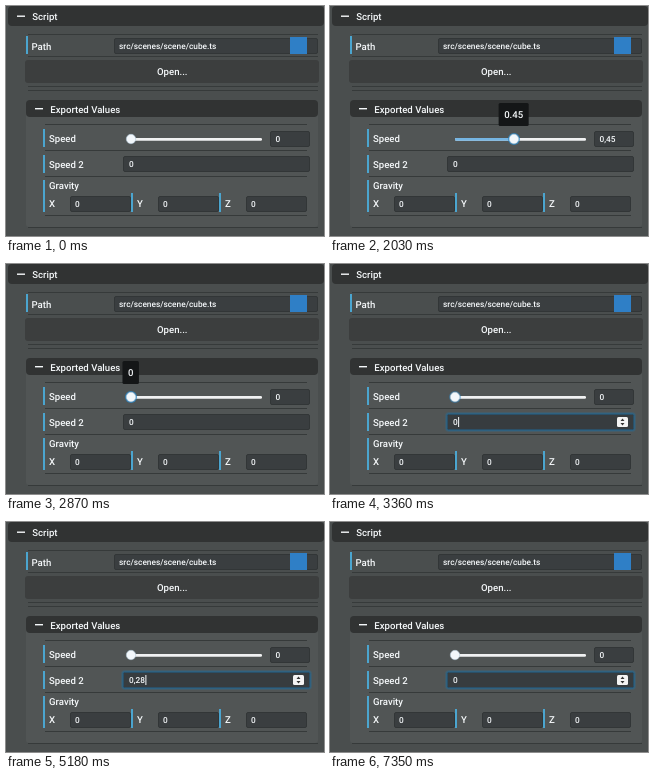
Animation, 318 px wide and 230 px high, one loop 7420 ms. Source, as an HTML page:

```html
<!DOCTYPE html>
<html lang="en">
<head>
<meta charset="utf-8">
<title>Inspector</title>
<style>
html, body { margin: 0; width: 100%; height: 100%; overflow: hidden; background: #4a4e4e; }
svg {
  display: block; width: 318px; height: 230px; fill: #f5f8fa;
  font: 500 9.6px Roboto, Arial, sans-serif; text-rendering: geometricPrecision;
}
.bar { fill: #313333; }
.button { fill: #3c3e3e; }
.mark { fill: #4ba5cf; }
.rule { stroke: #363a3a; stroke-width: 1; }
.field { fill: #3a3e40; stroke: #323637; stroke-width: 1; }
.value { font-size: 8.3px; }
</style>
</head>
<body>
<svg viewBox="0 0 318 230">
  <rect width="318" height="230" fill="#4a4e4e"/>
  <rect x="20" y="97" width="292" height="124" rx="3" fill="#515555"/>
  <g id="panel"></g>

  <rect x="284" y="31" width="17" height="17" fill="#2f7fc6"/>

  <g id="focus" fill="none">
    <rect x="116.5" y="149.5" width="188" height="17" rx="2" stroke="#137cbd" stroke-opacity=".25" stroke-width="2.5"/>
    <rect x="117" y="150" width="187" height="16" rx="1.5" fill="#373c3f" stroke="#1f6491"/>
  </g>
  <text id="speed2" class="value" x="123" y="161"></text>
  <rect id="caret" y="153" width="1" height="10"/>

  <rect x="125" y="132" width="131" height="2.7" rx="1.3" fill="#f0f1f2"/>
  <rect id="fill" x="125" y="132" height="2.7" rx="1.3" fill="#75b5e3"/>
  <g id="knob">
    <circle id="glow" r="6" fill="#2b86c4"/>
    <circle r="4.7" fill="#f2f7fb" stroke="#b4cad9" stroke-width=".6"/>
  </g>
  <text id="speed" class="value" x="269.5" y="136"></text>

  <g id="tip">
    <rect id="tipBox" y="97" height="23" rx="1.5" fill="#141617"/>
    <text id="tipText" y="112" text-anchor="middle"></text>
  </g>
  <g id="spin2"></g>
  <g id="spinY"></g>
</svg>
<script>
const LOOP = 7420, STEP = 70;
const el = id => document.getElementById(id);

const rect = (cls, x, y, w, h, r = 0) =>
  `<rect class="${cls}" x="${x}" y="${y}" width="${w}" height="${h}" rx="${r}"/>`;
const text = (s, x, y, cls = '') => `<text class="${cls}" x="${x}" y="${y}">${s}</text>`;
const rule = (y, x1, x2) => `<path class="rule" d="M${x1} ${y}.5H${x2}"/>`;
const mark = (x, y, h) => rect('mark', x, y, 2, h);
const field = (x, y, w, s = '') =>
  rect('field', x + .5, y + .5, w - 1, 15, 1.5) + text(s, x + 5, y + 11, 'value');
const header = (s, x, y, w, h) =>
  rect('bar', x, y, w, h, 4) + rect('', x + 9, y + h / 2 - .5, 8, 1.4) + text(s, x + 24.3, y + h / 2 + 4);
const spinner = (x, y) =>
  `<rect x="${x}" y="${y}" width="11" height="10" rx="1.5" fill="#f4f4f4"/>
   <path d="M${x + 3.5} ${y + 4}l2-2.4 2 2.4zM${x + 3.5} ${y + 6}l2 2.4 2-2.4z" fill="#333"/>`;

el('panel').innerHTML = [
  header('Script', 2, 0, 316, 20),
  rule(28, 22, 312), mark(20, 30, 18), text('Path', 25.5, 44),
  field(108, 32, 204, 'src/scenes/scene/cube.ts'), rule(50, 22, 312),
  rect('button', 19, 54, 294, 23, 3), text('Open...', 151, 69),
  rule(80, 22, 312), rule(84, 22, 312),
  header('Exported Values', 20, 94, 292, 17),
  rule(118, 39, 301), mark(37, 123, 18), text('Speed', 43, 136), field(264, 125, 40),
  rule(144, 39, 301), mark(37, 149, 18), text('Speed 2', 43, 162), field(117, 150, 187),
  rule(170, 39, 301), mark(37, 174, 32), text('Gravity', 43, 183),
  ...['X', 'Y', 'Z'].map((axis, i) => {
    const x = 37 + 88 * i;
    return (i ? mark(x, 187, 19) : '') + text(axis, x + 6, 201) + field(x + 27, 190, 61, '0');
  }),
  rule(209, 39, 301), rule(221, 22, 312)
].join('');
el('spin2').innerHTML = spinner(287, 153);
el('spinY').innerHTML = spinner(197, 193);

// Linear interpolation through [time, value] points
function track(points, t) {
  const i = points.findIndex(p => p[0] > t);
  if (i < 0) return points[points.length - 1][1];
  if (!i) return points[0][1];
  const [a, va] = points[i - 1], [b, vb] = points[i];
  return va + (vb - va) * (t - a) / (b - a);
}

const drag = [[1680, 0], [1750, .06], [2030, .45], [2170, .57], [2240, .59], [2310, .53],
  [2380, .42], [2520, .21], [2660, .06], [2730, .02], [2800, 0]];
const keys = [[3990, 0], [4340, .14], [4830, .14], [5180, .28], [5460, .39], [5600, .39], [6370, 0]];
const glowKeys = [[980, 0], [1260, .8], [3220, .8], [3570, 0]];
const tipKeys = [[980, 0], [1050, .6], [1120, 1], [2870, 1], [2940, 0]];
const focusKeys = [[3150, 0], [3360, 1]];

const format = v => v < .005 ? '0' : String(+v.toFixed(2));
const comma = s => s.replace('.', ',');
const set = (id, name, v) => el(id).setAttribute(name, v);
const show = (id, on) => set(id, 'opacity', +on);

function draw(t) {
  const speed = track(drag, t), label = format(speed), x = 125 + 131 * speed;
  set('fill', 'width', 131 * speed);
  set('knob', 'transform', `translate(${x} 133)`);
  show('glow', track(glowKeys, t));
  el('speed').textContent = comma(label);

  el('tipText').textContent = label;
  const w = 11 + el('tipText').getComputedTextLength();
  set('tipText', 'x', x - .3);
  set('tipBox', 'x', x - .3 - w / 2);
  set('tipBox', 'width', w);
  show('tip', track(tipKeys, t));

  el('speed2').textContent = comma(format(track(keys, t)));
  set('caret', 'x', 123.4 + el('speed2').getComputedTextLength());
  show('caret', t >= 3290 && t < 7350);
  show('focus', track(focusKeys, t));
  show('spin2', t >= 3150);
  show('spinY', t >= 6720 && t < 7000);
}

const start = performance.now();
function frame() {
  const t = (performance.now() - start) % LOOP;
  draw(Math.floor(t / STEP) * STEP);
  requestAnimationFrame(frame);
}
frame();
</script>
</body>
</html>
```
